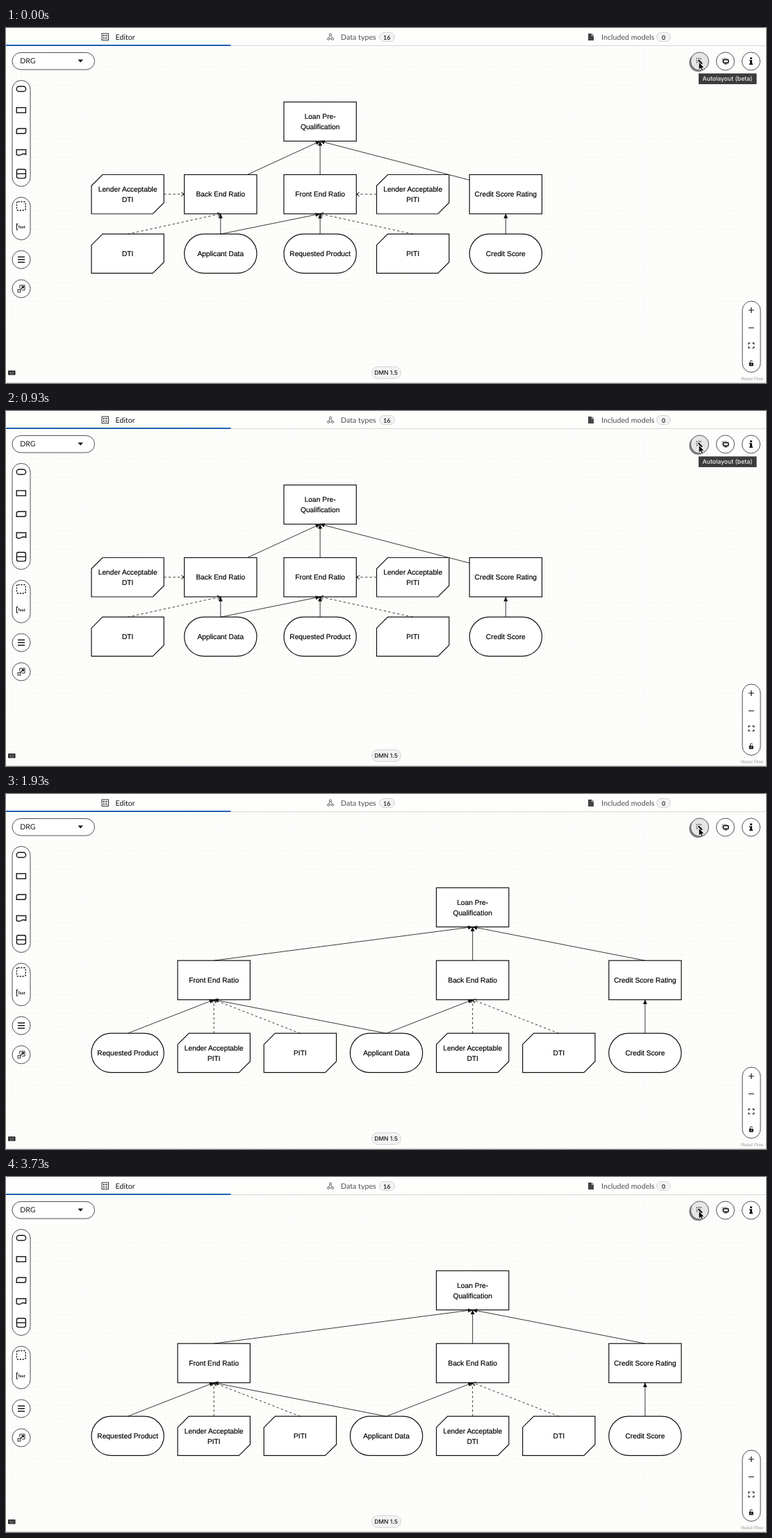
Recreate the animation shown at these times as an HTML page. Size 1094 px wide and 512 px high, loop 3.8 s.

```html
<!DOCTYPE html>
<html lang="en">
<head>
<meta charset="utf-8">
<title>Decision diagram autolayout</title>
<style>
  html, body { margin: 0; width: 100%; height: 100%; overflow: hidden; background: #fff; }
  svg { display: block; width: 100vw; height: 100vh; font-family: Lato, sans-serif; text-rendering: geometricPrecision; }
  .node { fill: #fff; stroke: #111; stroke-width: 1.2; }
  .label { font: 10.25px "Liberation Sans", Arial, sans-serif; fill: #000; stroke: #000; stroke-width: .18; text-anchor: middle; }
  .edge { fill: none; stroke: #222; stroke-width: .9; }
  .dashed { stroke-dasharray: 3.3 3.3; }
  .panel { fill: #fff; stroke: #46464e; stroke-width: .95; }
  .icon { fill: none; stroke: #151515; stroke-width: 1.4; }
  .tab { font-size: 10.7px; fill: #4f4f4f; }
  .pill { fill: #f3f3f3; stroke: #d2d2d2; stroke-width: .9; }
  .badge { font-size: 9px; font-weight: 700; fill: #333; text-anchor: middle; }
</style>
</head>
<body>
<svg viewBox="0 0 1094 512">
  <defs>
    <pattern id="dots" width="13" height="13" patternUnits="userSpaceOnUse">
      <g fill="#f5f5dc">
        <circle cx="2" cy="4" r=".8"/><circle cx="8.5" cy="4" r=".8"/>
        <circle cx="2" cy="10.5" r=".8"/>
      </g>
      <circle cx="8.5" cy="10.5" r=".7" fill="#e9e9f2"/>
    </pattern>
    <marker id="solid" viewBox="0 0 7 6" refX="6.6" refY="3" markerWidth="7" markerHeight="6" markerUnits="userSpaceOnUse" orient="auto">
      <path d="M0 0L7 3L0 6z" fill="#111"/>
    </marker>
    <marker id="open" viewBox="0 0 7 7" refX="6" refY="3.5" markerWidth="7" markerHeight="7" markerUnits="userSpaceOnUse" orient="auto">
      <path d="M1.5 .8L6 3.5L1.5 6.2" fill="none" stroke="#111"/>
    </marker>
  </defs>

  <rect width="1094" height="512" fill="#fdfdfc"/>
  <rect y="26" width="1094" height="486" fill="url(#dots)"/>
  <path d="M0 511.5H1094" stroke="#dcdcdc"/>

  <g id="before"></g>
  <g id="after"></g>

  <!-- tabs -->
  <rect width="1094" height="25" fill="#fefefd"/>
  <path d="M0 25.5H1094" stroke="#d6d6d6"/>
  <rect y="24" width="323.5" height="2" fill="#2160ad"/>
  <g fill="none" stroke="#333">
    <rect x="138" y="8" width="9.5" height="9.5"/>
    <path d="M139.8 11H142.2M143.4 11H145.8M139.8 14.5H142.2M143.4 14.5H145.8" stroke-width="2" stroke-dasharray="1.4 .4"/>
    <g stroke="#555" stroke-width=".9">
      <circle cx="467" cy="9.8" r="1.6"/><circle cx="464" cy="15.8" r="1.5"/><circle cx="470.2" cy="15.8" r="1.5"/>
      <path d="M466.2 11.3L464.6 14.3M467.8 11.3L469.5 14.3M465.6 15.8H468.6"/>
    </g>
  </g>
  <path d="M838 8H843V11.2H846V18H838zM843.7 8L846 10.5H843.7z" fill="#444"/>
  <text class="tab" x="157.5" y="16.8" style="fill:#151515">Editor</text>
  <text class="tab" x="482" y="16.8">Data types</text>
  <text class="tab" x="857" y="16.8">Included models</text>
  <rect class="pill" x="537.5" y="6.5" width="22" height="13" rx="6.5"/>
  <text class="badge" x="548.3" y="16.5">16</text>
  <rect class="pill" x="936.5" y="6.5" width="20" height="13" rx="6.5"/>
  <text class="badge" x="946.5" y="16.5">0</text>

  <!-- diagram selector -->
  <rect class="panel" x="9" y="35.5" width="118.5" height="24.5" rx="12.2"/>
  <text x="20.3" y="51.2" font-size="10.5" fill="#151515">DRG</text>
  <path d="M103.5 45.6H111L107.2 49.8z" fill="#151515"/>

  <!-- palette -->
  <rect class="panel" x="9" y="75.5" width="26" height="153" rx="13"/>
  <g class="icon">
    <rect x="15.2" y="84.3" width="13.4" height="7.2" rx="3.6"/>
    <rect x="15.2" y="114.8" width="13.2" height="7.4"/>
    <path d="M18.2 145H28.6V149.5Q28.6 152.3 25.8 152.3H15.2V148Q15.2 145 18.2 145z"/>
    <path d="M15.2 175.5H28.6V182.3Q25 180.5 22 182.5T15.2 182.7z"/>
    <rect x="15.4" y="203.8" width="13" height="12.8" rx="2.5"/>
    <path d="M15.4 210.2H28.4"/>
  </g>
  <rect class="panel" x="9" y="244" width="26" height="61.5" rx="13"/>
  <rect class="icon" x="15.4" y="250.5" width="12.8" height="12.5" rx="2" stroke-dasharray="2.2 1.7"/>
  <path class="icon" d="M17.3 282.6H15.4V291H17.3" style="stroke-width:1.1"/>
  <text x="17" y="289.3" font-size="5.8" font-weight="700" fill="#151515">Text</text>
  <circle class="panel" cx="22" cy="334" r="13"/>
  <path class="icon" d="M17 330.3H27M17 334H27M17 337.7H27"/>
  <circle class="panel" cx="22" cy="376" r="13"/>
  <g class="icon" style="stroke-width:.9">
    <rect x="17" y="377.4" width="3.8" height="3.6"/>
    <path d="M19.8 375.5V371H27V378H22.8"/>
    <path d="M20.6 377.4L25 373M22.4 372.8H25.2V375.6" stroke-width="1.3"/>
  </g>

  <!-- toolbar -->
  <circle cx="996.6" cy="49.8" r="13.2" fill="#7d7d82"/>
  <circle cx="998.5" cy="48" r="13" fill="#e6e6e6" stroke="#55555c"/>
  <path d="M996.6 46.2L1002 51.6" stroke="#111" stroke-width="2.2"/>
  <path d="M993.8 43.5L995 44.7M997.3 42.8V44.8M1000.8 43.5L999.4 44.9M993.4 47H995.2M994 50.3L995.4 49" stroke="#333" stroke-width="1.1"/>
  <circle class="panel" cx="1035.5" cy="48" r="13"/>
  <rect class="icon" x="1032.6" y="45.6" width="7.2" height="4.8" rx="1" style="stroke-width:1.6"/>
  <path class="icon" d="M1031 48.5V43.8H1038" style="stroke-width:.7" stroke-dasharray="1 .7"/>
  <path class="icon" d="M1034.4 52H1038" style="stroke-width:1"/>
  <circle class="panel" cx="1072.5" cy="48" r="13"/>
  <path d="M1071 42.6H1074V45H1071zM1070 46.2H1074V51.2H1075V53H1070V51.2H1071V47.8H1070z" fill="#151515"/>

  <!-- zoom controls -->
  <rect class="panel" x="1060" y="394" width="26" height="102.5" rx="13"/>
  <g class="icon" style="stroke-width:1.2">
    <path d="M1068.8 407H1076.8M1072.8 403V411M1068.8 432.5H1076.8"/>
    <path d="M1069 456.5V454.3H1071.2M1074.4 454.3H1076.6V456.5M1076.6 459.3V461.5H1074.4M1071.2 461.5H1069V459.3"/>
    <path d="M1071.2 483V481.2A1.7 1.7 0 0 1 1074.5 480.8" style="stroke-width:1"/>
  </g>
  <rect x="1069.7" y="482.7" width="6" height="4.8" rx=".6" fill="#151515"/>
  <circle cx="1072.7" cy="485" r=".8" fill="#fff"/>
  <text x="1058" y="507.7" font-family="Liberation Sans, Arial, sans-serif" font-size="6.4" fill="#999">React Flow</text>

  <rect class="pill" x="526.5" y="488.5" width="42" height="17" rx="8.5"/>
  <text x="547" y="500.2" font-family="Inter, sans-serif" font-size="8.5" font-weight="500" text-anchor="middle" fill="#151515">DMN 1.5</text>
  <rect x="3" y="494" width="10.5" height="6.5" rx=".8" fill="#222"/>
  <path d="M4.5 496H12M4.5 497.6H12M6 499.2H10.5" stroke="#ddd" stroke-width=".7" stroke-dasharray="1 .7"/>

  <g id="tooltip">
    <rect x="997" y="65.5" width="83.5" height="15.5" fill="#3c3c3e"/>
    <text x="1038.5" y="76.3" text-anchor="middle" font-family="Inter, sans-serif" font-size="8.7" font-weight="500" fill="#f1f1f1">Autolayout (beta)</text>
  </g>
  <path d="M997.2 49.2V60.2L999.8 57.9L1001.6 62L1003.6 61.1L1001.8 57.2H1005.2z" fill="#000" stroke="#fff" stroke-width=".8"/>
</svg>

<script>
const LOOP = 3800, TOOLTIP_END = 1530, LAYOUT_AT = 1800;
const W = 104.3, H = 56.5, CUT = 16;

const nodes = {
  loan: ["decision", "Loan Pre-", "Qualification"],
  back: ["decision", "Back End Ratio"],
  front: ["decision", "Front End Ratio"],
  rating: ["decision", "Credit Score Rating"],
  lenderDti: ["knowledge", "Lender Acceptable", "DTI"],
  lenderPiti: ["knowledge", "Lender Acceptable", "PITI"],
  dti: ["knowledge", "DTI"],
  piti: ["knowledge", "PITI"],
  applicant: ["input", "Applicant Data"],
  product: ["input", "Requested Product"],
  score: ["input", "Credit Score"],
};
const edges = [
  ["back", "loan"], ["front", "loan"], ["rating", "loan"],
  ["applicant", "back"], ["applicant", "front"], ["product", "front"], ["score", "rating"],
  ["lenderDti", "back"], ["dti", "back"], ["lenderPiti", "front"], ["piti", "front"],
];
const before = {
  loan: [400, 106.7],
  lenderDti: [123, 211.5], back: [256.7, 211.5], front: [400, 211.5], lenderPiti: [533.5, 211.5], rating: [667.2, 211.5],
  dti: [123, 297.2], applicant: [256.7, 297.2], product: [400, 297.2], piti: [533.5, 297.2], score: [667.2, 297.2],
};
const after = {
  loan: [619.5, 135.2],
  front: [247.1, 240.2], back: [619.5, 240.2], rating: [867.8, 240.2],
};
["product", "lenderPiti", "piti", "applicant", "lenderDti", "dti", "score"]
  .forEach((id, i) => after[id] = [123 + i * 124.13, 345.2]);

// Where the line between two node centres leaves the first node.
function borderPoint([fx, fy], [tx, ty]) {
  const dx = tx - fx, dy = ty - fy;
  const k = Math.min(W / 2 / Math.abs(dx), H / 2 / Math.abs(dy));
  return [fx + W / 2 + dx * k, fy + H / 2 + dy * k];
}

function edgeMarkup(places, [from, to]) {
  const source = places[from], target = places[to];
  const dashed = nodes[from][0] === "knowledge";
  const floating = places === before && to === "loan";
  let start = [source[0] + W / 2, source[1]], end = [target[0] + W / 2, target[1] + H];
  if (floating) start = borderPoint(source, target);
  if (source[1] === target[1]) {
    start = borderPoint(source, target);
    end = borderPoint(target, source);
  }
  return `<path class="edge ${dashed ? "dashed" : ""}" d="M${start}L${end}" marker-end="url(#${dashed ? "open" : "solid"})"/>`;
}

function nodeMarkup(places, id) {
  const [x, y] = places[id], [kind, ...lines] = nodes[id];
  const shape = kind === "knowledge"
    ? `<path class="node" d="M${x + CUT} ${y}H${x + W}V${y + H - CUT}L${x + W - CUT} ${y + H}H${x}V${y + CUT}z"/>`
    : `<rect class="node" x="${x}" y="${y}" width="${W}" height="${H}" rx="${kind === "input" ? H / 2 : 0}"/>`;
  const label = lines.map((line, i) => {
    const baseline = y + H / 2 + 3.7 + (i - (lines.length - 1) / 2) * 14.7;
    return `<text class="label" x="${x + W / 2}" y="${baseline}">${line}</text>`;
  });
  return shape + label.join("");
}

const get = id => document.getElementById(id);
const render = (id, places) => get(id).innerHTML =
  Object.keys(nodes).map(n => nodeMarkup(places, n)).join("") +
  edges.map(e => edgeMarkup(places, e)).join("");
render("before", before);
render("after", after);

const show = (id, visible) => get(id).style.display = visible ? "" : "none";
const origin = performance.now();
function frame() {
  const t = (performance.now() - origin) % LOOP;
  show("tooltip", t < TOOLTIP_END);
  show("before", t < LAYOUT_AT);
  show("after", t >= LAYOUT_AT);
  requestAnimationFrame(frame);
}
frame();
</script>
</body>
</html>
```
